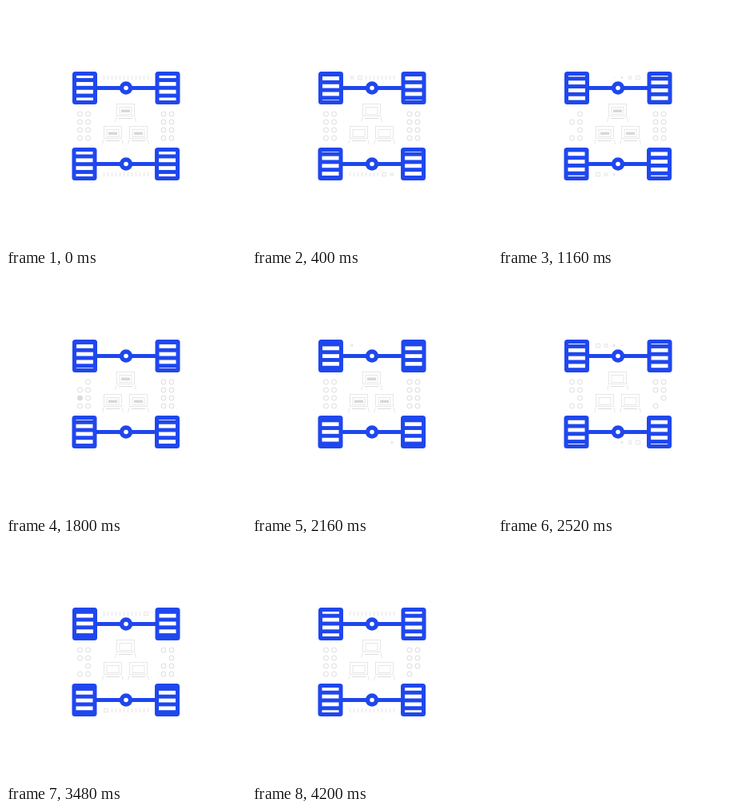
An HTML page with a canvas for the animation above (4.24 s loop, 300 by 300 pixels).

```html
<!DOCTYPE html>
<html lang="en">
<head>
<meta charset="utf-8">
<title>Axles</title>
<style>
html, body { margin: 0; width: 100%; height: 100%; overflow: hidden; background: #fff; }
canvas { display: block; width: 300px; height: 300px; }
</style>
</head>
<body>
<canvas id="stage" width="300" height="300"></canvas>
<script>
const ctx = document.getElementById('stage').getContext('2d');
const LOOP = 4240, STEP = 40;
const BLUE = '#1f47ee', FAINT = '#dedede', GREY = '#d4d4d4';
const PITCH = 9.75, GAP = 4.8;

const clamp = v => Math.min(1, Math.max(0, v));
const ease = v => v * v * (3 - 2 * v);

// hidden spans of the side lamps: x, y, then [from, to] in ms
const blinks = [
  [92.5, 135, [1000, 2000]],
  [92.5, 155, [1000, 1800], [2320, 2720], [3280, 3680]],
  [102.5, 165, [600, 960]],
  [197, 145, [600, 960], [3320, 3680]],
  [207, 145, [600, 960]],
  [197, 155, [2320, 2720]],
  [207, 165, [600, 960], [2320, 2720], [4040, 4240]]
];

function line(x1, y1, x2, y2) {
  ctx.beginPath();
  ctx.moveTo(x1, y1);
  ctx.lineTo(x2, y2);
  ctx.stroke();
}

function disc(x, y, r, color) {
  ctx.fillStyle = color;
  ctx.beginPath();
  ctx.arc(x, y, r, 0, Math.PI * 2);
  ctx.fill();
}

function wheel(x, t) {
  ctx.fillStyle = BLUE;
  ctx.beginPath();
  ctx.roundRect(x - 15.5, 82, 31, 41, 3.5);
  ctx.fill();
  ctx.fillStyle = '#fff';
  const shift = PITCH * (0.48 + 3 * t / LOOP) % PITCH;
  for (let i = -3; i <= 2; i++) {
    const y = 102.5 + shift + i * PITCH;
    const top = Math.max(87, y - GAP / 2);
    const end = Math.min(118, y + GAP / 2);
    if (end > top) ctx.fillRect(x - 10.5, top, 21, end - top);
  }
}

function blockScale(i, t) {
  const local = t - i * 200;
  const shrink = ease(clamp(local / 880));
  const grow = ease(clamp((local - 1763) / 880));
  return 1 - shrink + grow;
}

function blocks(t) {
  ctx.strokeStyle = FAINT;
  for (let i = 0; i < 6; i++) {
    const s = blockScale(i, t), x = 125 + i * 10, h = 2.5 * s;
    if (s > 0.99) {
      line(x - 2.5, 87, x - 2.5, 92);
      line(x + 2.5, 87, x + 2.5, 92);
    } else if (s > 0.3) {
      ctx.strokeRect(x - h, 89.5 - h, h * 2, h * 2);
    } else if (s > 0.005) {
      ctx.fillStyle = FAINT;
      ctx.fillRect(x - 0.5, 89, 1, 1);
    }
  }
}

function axle(t) {
  ctx.fillStyle = BLUE;
  ctx.fillRect(112, 100, 76, 5);
  wheel(98.5, t);
  wheel(202, t);
  disc(150, 102.5, 8.2, BLUE);
  disc(150, 102.5, 2.8, '#fff');
  blocks(t);
}

function laptop(x, y, lit) {
  ctx.strokeStyle = '#e2e2e2';
  ctx.strokeRect(x - 11, y + 0.5, 22, 15);
  ctx.strokeRect(x - 7.5, y + 4.5, 15, 9);
  line(x - 11.5, y + 17, x - 13, y + 23);
  line(x + 11.5, y + 17, x + 13, y + 23);
  ctx.strokeStyle = GREY;
  line(x - 8.5, y + 18.5, x + 8.5, y + 18.5);
  if (lit) {
    ctx.fillStyle = '#d8d8d8';
    ctx.fillRect(x - 5.5, y + 7.5, 11, 3.5);
  }
}

function lamp(x, y, t) {
  const entry = blinks.find(b => b[0] === x && b[1] === y);
  const spans = entry ? entry.slice(2) : [];
  if (spans.some(([a, b]) => t >= a && t < b)) return;
  if (spans.some(([, b]) => t >= b && t < b + STEP)) disc(x, y, 3, '#dcdcdc');
  ctx.strokeStyle = GREY;
  ctx.beginPath();
  ctx.arc(x, y, 3, 0, Math.PI * 2);
  ctx.stroke();
}

function draw(t) {
  ctx.fillStyle = '#fff';
  ctx.fillRect(0, 0, 300, 300);
  ctx.lineWidth = 0.8;

  axle(t);
  ctx.save();
  ctx.translate(300, 300);
  ctx.rotate(Math.PI);
  axle(t);
  ctx.restore();

  const lit = t % 530 < 220;
  laptop(149.5, 122, lit);
  laptop(133.5, 150, lit);
  laptop(165.5, 150, lit);

  for (const x of [92.5, 102.5, 197, 207])
    for (let y = 135; y <= 165; y += 10) lamp(x, y, t);
}

const start = performance.now();
function tick() {
  const t = (performance.now() - start) % LOOP;
  draw(Math.floor(t / STEP) * STEP);
  requestAnimationFrame(tick);
}
tick();
</script>
</body>
</html>
```
